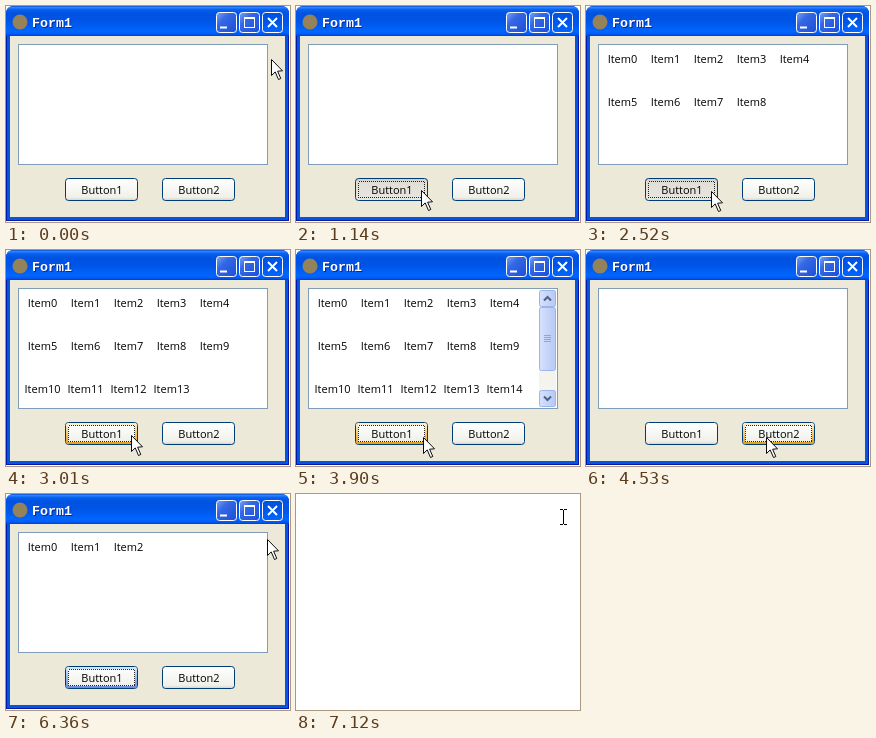
An HTML page for the animation above (7180 ms loop, 284x216 px).

```html
<!DOCTYPE html>
<html lang="en">
<head>
<meta charset="utf-8">
<title>Form1</title>
<style>
html, body { margin: 0; width: 100%; height: 100%; overflow: hidden; background: #fff; }
svg { display: block; width: 284px; height: 216px; }
text { font: 11px "Open Sans", "Noto Sans", sans-serif; text-anchor: middle; fill: #000; }
.caption { font: bold 13.33px "Liberation Mono", monospace; text-anchor: start; fill: #fff; }
.shade { fill: #0a2a9c; }
.face { fill: url(#face); stroke: #003c74; }
.ring { fill: none; stroke-width: 2; visibility: hidden; }
.hot .ring { stroke: url(#amber); visibility: visible; }
.focus:not(.hot) .ring { stroke: url(#sky); visibility: visible; }
.dots { fill: none; stroke: #222; stroke-dasharray: 1 1; visibility: hidden; }
.focus .dots { visibility: visible; }
.down .face { fill: url(#sunk); }
.down .ring { visibility: hidden !important; }
.cap { fill: none; stroke: #fff; }
.sign { fill: none; stroke: #fff; stroke-width: 2; }
#close.hot .fill { fill: url(#redHot); }
#close.down .fill { fill: #a02c10; }
.crisp { shape-rendering: crispEdges; }
</style>
</head>
<body>
<svg viewBox="0 0 284 216">
  <defs>
    <linearGradient id="bar" x2="0" y2="1">
      <stop stop-color="#0842c8"/><stop offset=".04" stop-color="#2a8cff"/>
      <stop offset=".12" stop-color="#0a5ff0"/><stop offset=".25" stop-color="#0053e1"/>
      <stop offset=".5" stop-color="#0054e6"/><stop offset=".85" stop-color="#0066ff"/>
      <stop offset=".93" stop-color="#005bf5"/><stop offset="1" stop-color="#003dd0"/>
    </linearGradient>
    <linearGradient id="face" x2="0" y2="1">
      <stop stop-color="#fff"/><stop offset=".86" stop-color="#f0f0ea"/><stop offset="1" stop-color="#d6d0c5"/>
    </linearGradient>
    <linearGradient id="sunk" x2="0" y2="1">
      <stop stop-color="#d1ccc1"/><stop offset=".2" stop-color="#e2dfd7"/><stop offset="1" stop-color="#e8e6e0"/>
    </linearGradient>
    <linearGradient id="amber" x2="0" y2="1">
      <stop stop-color="#ffefc8"/><stop offset=".4" stop-color="#fbd07a"/><stop offset="1" stop-color="#e8a018"/>
    </linearGradient>
    <linearGradient id="sky" x2="0" y2="1">
      <stop stop-color="#cee7ff"/><stop offset="1" stop-color="#6f8ee0"/>
    </linearGradient>
    <linearGradient id="blue" x2="1" y2="1">
      <stop stop-color="#7ba4f5"/><stop offset=".35" stop-color="#3468e4"/><stop offset="1" stop-color="#1c4fd8"/>
    </linearGradient>
    <linearGradient id="red" x2="1" y2="1">
      <stop stop-color="#f0a088"/><stop offset=".35" stop-color="#e3582f"/><stop offset="1" stop-color="#c63c12"/>
    </linearGradient>
    <linearGradient id="redHot" x2="1" y2="1">
      <stop stop-color="#ffc0aa"/><stop offset=".4" stop-color="#fb7a52"/><stop offset="1" stop-color="#e85a30"/>
    </linearGradient>
    <linearGradient id="grip">
      <stop stop-color="#d6e2fe"/><stop offset="1" stop-color="#b6c8f4"/>
    </linearGradient>
  </defs>

  <g id="window">
    <path d="M0 215V8Q0 0 8 0H275Q283 0 283 8V215Z" fill="#0831d9"/>
    <path d="M1 214V8Q1 1 8 1H275Q282 1 282 8V214Z" fill="#0855dd"/>
    <path d="M0 30V8Q0 0 8 0H275Q283 0 283 8V30Z" fill="url(#bar)"/>
    <g class="crisp">
      <path d="M0 30H1V215H0ZM282 30H283V215H282ZM0 214H283V215H0Z" fill="#0019a8"/>
      <rect x="4" y="30" width="275" height="181" fill="#ece9d8"/>
      <rect x="12.5" y="38.5" width="249" height="120" fill="#fff" stroke="#7f9db9"/>
    </g>
    <circle cx="14" cy="16" r="7.5" fill="#94825a"/>
    <text class="caption shade" x="27" y="22">Form1</text>
    <text class="caption" x="26" y="21">Form1</text>

    <g>
      <rect class="cap" x="210.5" y="6.5" width="20" height="20" rx="3" style="fill:url(#blue)"/>
      <path class="sign" d="M214 21.5H221" stroke-width="3"/>
      <rect class="cap" x="233.5" y="6.5" width="20" height="20" rx="3" style="fill:url(#blue)"/>
      <path class="sign crisp" d="M238 12H249M238.5 11V21.5H248.5V11" style="stroke-width:1"/>
      <path class="sign crisp" d="M238 12H249"/>
    </g>
    <g id="close">
      <rect class="cap fill" x="256.5" y="6.5" width="20" height="20" rx="3" style="stroke:#fff" fill="url(#red)"/>
      <path class="sign" d="M262 12L271 21M271 12L262 21"/>
    </g>

    <g id="items"></g>

    <g id="scroll">
      <rect x="243" y="40" width="17" height="117" fill="#f4f3ee"/>
      <g fill="url(#grip)" stroke="#9db3ea">
        <rect x="243.5" y="40.5" width="16" height="16" rx="2"/>
        <rect x="243.5" y="140.5" width="16" height="16" rx="2"/>
        <rect x="243.5" y="57.5" width="16" height="63" rx="2"/>
      </g>
      <path d="M248 50.5L251.5 47L255 50.5M248 146.5L251.5 150L255 146.5" fill="none" stroke="#4d6185" stroke-width="2"/>
      <path class="crisp" d="M248 85.5H255M248 87.5H255M248 89.5H255M248 91.5H255" stroke="#8ba5e4"/>
    </g>

    <g id="buttons"></g>
  </g>

  <path id="arrow" d="M.5 .5V16.5L4.2 12.9 7.5 20.5 9.8 19.5 6.6 12.2 11.5 11.8Z" fill="#fff" stroke="#000" stroke-width=".95"/>
  <path id="beam" class="crisp" d="M264 15.5H267M268 15.5H271M267.5 16V30M264 30.5H267M268 30.5H271" stroke="#000"/>
</svg>
<script>
const LOOP = 7180, TICK = 60;
const $ = id => document.getElementById(id);

// Item labels: five columns, three rows
$('items').innerHTML = Array.from({ length: 15 }, (_, i) =>
  `<text x="${36.5 + 43 * (i % 5)}" y="${57 + 43 * Math.floor(i / 5)}">Item${i}</text>`).join('');
const labels = [...$('items').children];

const button = (id, x) => `<g id="${id}">
  <rect class="face" x="${x + .5}" y="172.5" width="72" height="22" rx="3"/>
  <rect class="ring" x="${x + 2}" y="174" width="69" height="19" rx="1.5"/>
  <rect class="dots crisp" x="${x + 3.5}" y="175.5" width="66" height="16"/>
  <text x="${x + 37}" y="188">Button${id.slice(1)}</text></g>`;
$('buttons').innerHTML = button('b1', 59) + button('b2', 156);

const areas = {
  b1: [59, 172, 73, 23],
  b2: [156, 172, 73, 23],
  close: [256, 6, 21, 21]
};

// [time, item count, held control]
const events = [
  [0, 0], [1140, 0, 'b1'], [1200, 1], [1330, 2], [1390, 2, 'b1'], [1450, 3],
  [1580, 4], [1710, 4, 'b1'], [1770, 5],
  [1900, 5, 'b1'], [1960, 6], [2020, 6, 'b1'], [2080, 7], [2210, 7, 'b1'], [2270, 8],
  [2330, 8, 'b1'], [2390, 9], [2520, 9, 'b1'], [2580, 10],
  [2640, 10, 'b1'], [2700, 11], [2760, 11, 'b1'], [2820, 12], [2880, 13], [3010, 14],
  [3070, 14, 'b1'], [3130, 15], [3260, 15, 'b1'], [3320, 16], [3380, 16, 'b1'], [3440, 17],
  [4470, 17, 'b2'], [4530, 0],
  [5230, 0, 'b1'], [5360, 1], [5490, 1, 'b1'], [5550, 2], [5680, 2, 'b1'], [5740, 3],
  [6930, 3, 'close'], [7060, 3]
];

const smooth = p => p * p * (3 - 2 * p);
const slow = p => 1 - (1 - p) ** 1.6;

// Pointer moves along quadratic curves, one position per tick
const moves = [
  { at: 200, steps: 9, from: [265, 53], via: [215, 125], to: [125, 184], ease: smooth },
  { at: 2080, steps: 1, from: [125, 184], via: [125, 185], to: [125, 185], ease: smooth },
  { at: 3900, steps: 5, from: [125, 185], via: [133, 195], to: [180, 187], ease: smooth },
  { at: 4730, steps: 5, from: [180, 187], via: [155, 187], to: [129, 189], ease: smooth },
  { at: 5940, steps: 12, from: [129, 189], via: [265, 86], to: [265, 22], ease: slow }
];

const last = (list, test) => list.filter(test).pop();

function pointer(t) {
  const m = last(moves, m => t >= m.at);
  if (!m) return moves[0].from;
  const k = Math.min(m.steps, Math.floor((t - m.at) / TICK) + 1);
  const s = m.ease(k / m.steps), r = 1 - s;
  return [0, 1].map(i => Math.round(r * r * m.from[i] + 2 * r * s * m.via[i] + s * s * m.to[i]));
}

function draw(t) {
  const open = t < 7120;
  $('window').style.display = $('arrow').style.display = open ? '' : 'none';
  $('beam').style.display = open ? 'none' : '';
  if (!open) return;

  const [, count, held] = last(events, e => t >= e[0]);
  const focus = t < 1140 ? '' : t >= 4470 && t < 5230 ? 'b2' : 'b1';
  const [px, py] = pointer(t);
  $('arrow').setAttribute('transform', `translate(${px} ${py})`);

  for (const [id, [x, y, w, h]] of Object.entries(areas)) {
    const c = $(id).classList;
    c.toggle('hot', px >= x && px < x + w && py >= y && py < y + h);
    c.toggle('focus', id === focus);
    c.toggle('down', id === held);
  }
  labels.forEach((el, i) => el.style.display = i < count ? '' : 'none');
  $('scroll').style.display = count > 15 ? '' : 'none';
}

const start = performance.now();
function frame() {
  draw((performance.now() - start) % LOOP);
  requestAnimationFrame(frame);
}
frame();
</script>
</body>
</html>
```
